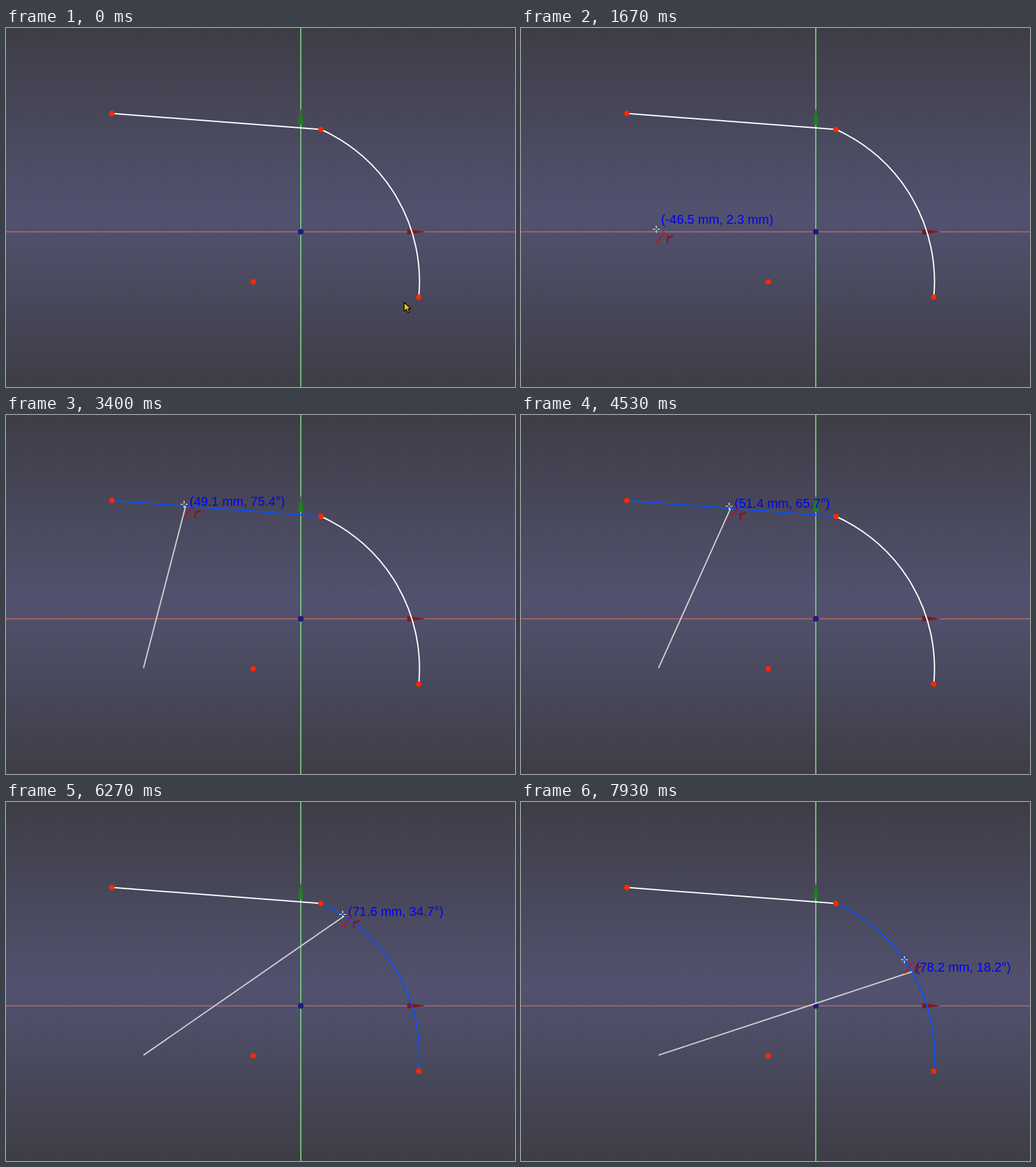
An HTML page for the animation above (8 s loop, 796 by 561 pixels).

```html
<!DOCTYPE html>
<html lang="en">
<head>
<meta charset="utf-8">
<title>Sketch line tool</title>
<style>
  html, body { margin: 0; width: 100%; height: 100%; overflow: hidden; background: #3e3d46; }
  svg { display: block; width: 796px; height: 561px; }
  .grid { stroke: #4a4a4f; stroke-opacity: .7; stroke-dasharray: 3 3; fill: none; }
  .edge { stroke: #fff; stroke-width: 2; fill: none; }
  .axis-x { stroke: #be6866; stroke-width: 1.4; }
  .axis-y { stroke: #72c47a; stroke-width: 2; }
  .hot { stroke: #0a50fa; }
  .dot { fill: #ff2800; }
  #draft { stroke: #cfcfcf; stroke-width: 2; }
  #label { font: 20px "Liberation Sans", Arial, sans-serif; fill: #0000f8; white-space: pre; }
</style>
</head>
<body>
<svg viewBox="0 0 796 561">
  <defs>
    <linearGradient id="sky" x1="0" y1="0" x2="0" y2="1">
      <stop offset="0" stop-color="#3e3d46"/>
      <stop offset=".52" stop-color="#525270"/>
      <stop offset="1" stop-color="#3e3d46"/>
    </linearGradient>
  </defs>
  <rect width="796" height="561" fill="url(#sky)"/>
  <path class="grid" id="grid"/>

  <path class="axis-x" id="axisX" d="M0 318.5H796"/>
  <path class="axis-y" id="axisY" d="M461 0V561"/>
  <path d="M461 125L465.5 150Q461 153 456.5 150Z" fill="#1d7f20"/>
  <path d="M656 318.5L628 323Q626.5 318.5 628 314Z" fill="#7b1c20"/>
  <circle cx="461" cy="318.5" r="4.6" fill="#1e1c80"/>

  <path class="edge" id="top" d="M165.5 133.5L492.5 158.5"/>
  <path class="edge" id="arc" d="M492.5 158.5A260.2 260.2 0 0 1 645.5 420.5"/>
  <line id="draft"/>
  <g class="dot">
    <circle cx="165.5" cy="133.5" r="4.3"/>
    <circle cx="492.5" cy="158.5" r="4.3"/>
    <circle cx="386.5" cy="396.5" r="4.3"/>
    <circle cx="645.5" cy="420.5" r="4.3"/>
  </g>
  <text id="label"></text>

  <g id="cross" fill="none">
    <path d="M-5 .5H-1M2 .5H6M.5 -5V-1M.5 2V6" stroke="#fff" stroke-width="1.2"/>
    <path d="M3 18.5L11 7.5" stroke="#c00c10" stroke-width="1.4"/>
    <circle cx="2" cy="20" r="1.8" stroke="#d00c10"/>
    <circle cx="12" cy="6" r="1.8" stroke="#d00c10"/>
    <path d="M18 22.5V16Q18 12.5 22 12L27 10.5" stroke="#86141a" stroke-width="2.4"/>
    <path d="M17 11H22V15H17Z" fill="#9a1216"/>
  </g>
  <path id="arrow" d="M.7 .7V14.5L4 11.6L6.4 16.6L8.8 15.4L6.5 10.6H11Z"
        fill="#ffc400" stroke="#000" stroke-width="1.2" stroke-linejoin="round"/>
</svg>
<script>
const $ = id => document.getElementById(id);
const STEP = 1000 / 15, STEPS = 120;
const SCALE = 16 / 3;                       // pixels per millimetre
const ORIGIN = { x: 461, y: 318.5 }, START = { x: 215, y: 395.6 };
const LEFT = { x: 165.5, y: 133.5 }, CORNER = { x: 492.5, y: 158.5 };
const CENTER = { x: 386.5, y: 396.1 }, RADIUS = 260.2;
const TOOL_ON = 21, CLICK = 30;

// Key points of [step, value], joined by straight runs.
const fallY = [[TOOL_ON, 86], [25, 306.2], [29, START.y]];
const sweep = [[37, 92], [39, 93], [41, 93], [51, 75.4], [52, 75.4], [60, 65.7], [75, 65.7],
  [84, 59.1], [85, 59.1], [94, 34.7], [96, 34.7], [109, 14.8], [114, 23.2], [116, 23.2],
  [119, 18.2], [120, 23.2]];

const lerp = (a, b, f) => a + (b - a) * f;
const clamp = f => Math.min(1, Math.max(0, f));
const smooth = f => f * f * (3 - 2 * f);

function follow(keys, k) {
  const i = Math.max(1, keys.findIndex(key => key[0] >= k));
  if (k >= keys[keys.length - 1][0]) return keys[keys.length - 1][1];
  const [k0, v0] = keys[i - 1], [k1, v1] = keys[i];
  return lerp(v0, v1, clamp((k - k0) / (k1 - k0)));
}

// Distance from the start point to the outline along a direction.
function reach(angle) {
  const c = Math.cos(angle), s = Math.sin(angle);
  const slope = (CORNER.y - LEFT.y) / (CORNER.x - LEFT.x);
  const toLine = (START.y - LEFT.y - slope * (START.x - LEFT.x)) / (s + slope * c);
  if (START.x + toLine * c <= CORNER.x) return toLine;
  const dx = CENTER.x - START.x, dy = START.y - CENTER.y, along = dx * c + dy * s;
  return along + Math.sqrt(along ** 2 - dx ** 2 - dy ** 2 + RADIUS ** 2);
}

// The edge that catches the pointer at a sweep angle, if any.
function snapped(degrees) {
  if (degrees > 56) return 'top';
  return degrees > 16 && degrees < 38 ? 'arc' : '';
}

function tipAt(k) {
  if (k < CLICK) {
    const y = follow(fallY, k);
    return { x: START.x + (y - START.y) * .022, y };
  }
  const degrees = follow(sweep, k), angle = degrees * Math.PI / 180;
  const grow = smooth(clamp((k - CLICK) / 7));
  const length = reach(angle) * grow * (snapped(degrees) ? 1 : .97);
  return {
    x: START.x + length * Math.cos(angle), y: START.y - length * Math.sin(angle),
    degrees, length, edge: grow > .9 ? snapped(degrees) : ''
  };
}

// A curved drift to the left, then a straight run up to the toolbar.
function arrowAt(k) {
  const t = clamp(k / 6), exit = clamp((k - 8) / 2);
  const bend = (a, b, c) => lerp(lerp(a, b, t), lerp(b, c, t), t);
  return { x: lerp(bend(622, 450, 332), 162, exit), y: lerp(bend(428, 300, 370), 165, exit) };
}

const show = (el, on) => el.setAttribute('visibility', on ? 'visible' : 'hidden');
const heat = (id, on) => $(id).classList.toggle('hot', on);
const place = (id, x, y) => $(id).setAttribute('transform', `translate(${x} ${y})`);
const mm = pixels => (pixels / SCALE).toFixed(1) + ' mm';

function caption(tip) {
  return tip.edge === undefined
    ? `(${mm(tip.x - ORIGIN.x)}, ${mm(ORIGIN.y - tip.y)})`
    : `(${mm(tip.length)}, ${tip.degrees.toFixed(1)}°)`;
}

function buildGrid() {
  const gap = 10 * SCALE;
  let d = '';
  for (let n = -8; n <= 6; n++) {
    if (!n) continue;
    d += `M${Math.floor(ORIGIN.x + n * gap) + .5} 0V561`;
    if (Math.abs(n) < 6) d += `M0 ${Math.floor(ORIGIN.y + n * gap) + .5}H796`;
  }
  $('grid').setAttribute('d', d);
}

function draw(k) {
  const tool = k >= TOOL_ON, drafting = k > CLICK;
  const tip = tipAt(k), lead = tipAt(k + .5), arrow = arrowAt(k);
  const free = tool && !tip.edge;

  show($('arrow'), k < 11);
  show($('cross'), tool);
  show($('label'), tool);
  show($('draft'), drafting);

  heat('top', tip.edge === 'top');
  heat('arc', tip.edge === 'arc');
  heat('axisX', free && Math.abs(tip.y - ORIGIN.y) < 11);
  heat('axisY', free && Math.abs(tip.x - ORIGIN.x) < 12);

  place('arrow', arrow.x, arrow.y);
  place('cross', Math.round(lead.x - 2.5), Math.round(lead.y - 3.5));
  place('label', Math.round(tip.x + 6), Math.round(tip.y - .6));
  $('label').textContent = caption(tip);
  const ends = { x1: START.x, y1: START.y, x2: tip.x, y2: tip.y };
  for (const name in ends) $('draft').setAttribute(name, ends[name]);
}

function tick() {
  draw(Math.floor((performance.now() + 4) / STEP) % STEPS);
  requestAnimationFrame(tick);
}

buildGrid();
tick();
</script>
</body>
</html>
```
